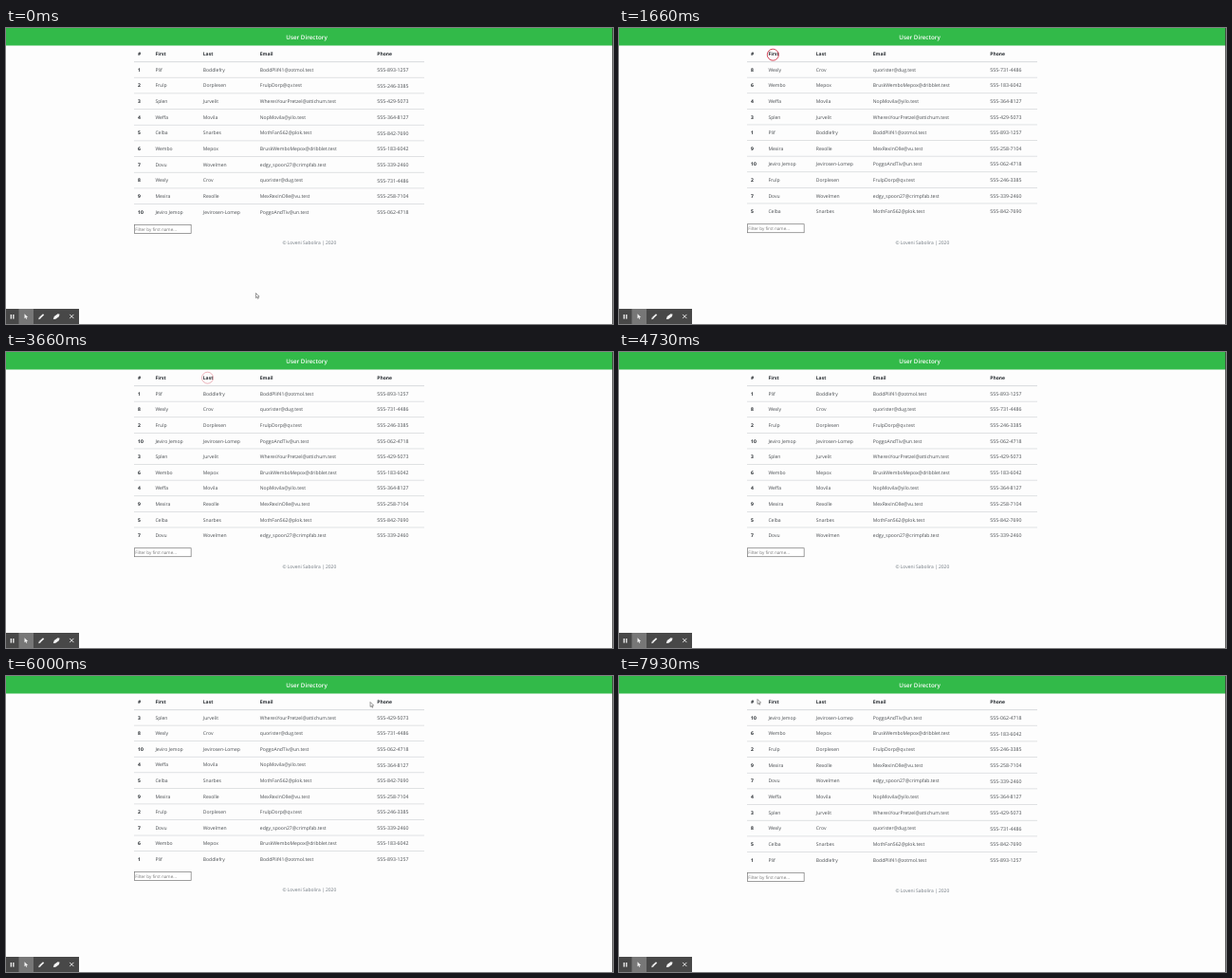
An HTML page with a canvas for the animation above (8 s loop, 640 by 312 pixels).

```html
<!DOCTYPE html>
<html lang="en">
<head>
<meta charset="utf-8">
<title>User Directory</title>
<style>
html, body { margin: 0; width: 100%; height: 100%; overflow: hidden; background: #fdfdfd; }
canvas { display: block; width: 640px; height: 312px; }
</style>
</head>
<body>
<canvas id="stage"></canvas>
<script>
const LOOP = 8000;
const FONT = '"Open Sans", "Noto Sans", sans-serif';
const canvas = document.getElementById('stage');
const ctx = canvas.getContext('2d');
const dpr = window.devicePixelRatio || 1;
canvas.width = 640 * dpr;
canvas.height = 312 * dpr;

const COLUMNS = [139, 157.4, 207.8, 267.8, 391.3];
const TITLES = ['#', 'First', 'Last', 'Email', 'Phone'];
const TITLE_ENDS = [143, 169, 218, 282, 408];
const USERS = [
  ['1', 'Plif', 'Boddlefry', 'BoddPlif41@zotmol.test', '555-893-1257'],
  ['2', 'Frulp', 'Dorplesen', 'FrulpDorp@qv.test', '555-246-3385'],
  ['3', 'Splen', 'Jurvelit', 'WheresYourPretzel@attichum.test', '555-429-5073'],
  ['4', 'Weffa', 'Movila', 'NopMovila@yilo.test', '555-364-8127'],
  ['5', 'Celba', 'Snarbes', 'MothFan562@plok.test', '555-842-7690'],
  ['6', 'Wembo', 'Mepox', 'BruskWemboMepox@dribblet.test', '555-183-6042'],
  ['7', 'Dovu', 'Wovelmen', 'edgy_spoon27@crimpfab.test', '555-339-2460'],
  ['8', 'Wexly', 'Crov', 'quorister@dug.test', '555-731-4486'],
  ['9', 'Mexira', 'Rexolle', 'MexRexInOlle@vu.test', '555-258-7104'],
  ['10', 'Jeviro Jemop', 'Jevirosen-Lomep', 'PoggoAndTiv@un.test', '555-062-4718']
];

function sortBy(col, dir) {
  const key = user => user[col].toLowerCase();
  return [...USERS].sort((a, b) => dir * (key(a) < key(b) ? -1 : 1));
}

// Each click sorts the table shortly after the press.
const SORT_DELAY = 90;
const RIPPLE = 600;
const FULL_PITCH = 16.67;
const CLICKS = [
  { at: 1260, x: 162.3, y: 28.2, rows: sortBy(1, -1), pitch: 16.6 },
  { at: 3120, x: 212.5, y: 27.2, rows: sortBy(2, 1), pitch: 16.6 },
  { at: 4760, x: 273, y: 27.2, rows: sortBy(3, -1), pitch: 16.56 },
  { at: 6730, x: 397, y: 27.2, rows: sortBy(4, 1), pitch: FULL_PITCH }
];

// Pointer path: time, x, y
const PATH = [
  [0, 263.5, 279.5], [60, 262.5, 278], [400, 240, 160], [700, 172, 60],
  [860, 156, 35], [1060, 162, 28], [1860, 162, 28], [2060, 170, 27.5],
  [2500, 198, 27], [2900, 212.5, 27], [3800, 212.5, 27], [4300, 246, 28],
  [4660, 273, 27], [5360, 273, 27], [5660, 304, 30], [6000, 384, 27.5],
  [6260, 397, 27], [7250, 397, 27], [7530, 338, 34], [7750, 224, 35],
  [7930, 146, 24.5], [8000, 146, 24.5]
];

const slope = (i, k) => (PATH[i + 1][k] - PATH[i][k]) / (PATH[i + 1][0] - PATH[i][0]);

function tangent(i, k) {
  if (i === 0 || i === PATH.length - 1) return 0;
  const a = slope(i - 1, k), b = slope(i, k);
  return a * b <= 0 ? 0 : 2 * a * b / (a + b);
}

function pointer(t) {
  let i = 0;
  while (i < PATH.length - 2 && t >= PATH[i + 1][0]) i++;
  const span = PATH[i + 1][0] - PATH[i][0];
  const u = (t - PATH[i][0]) / span;
  return [1, 2].map(k =>
    PATH[i][k] * (1 + 2 * u) * (1 - u) ** 2 +
    PATH[i + 1][k] * u * u * (3 - 2 * u) +
    span * u * (1 - u) * ((1 - u) * tangent(i, k) - u * tangent(i + 1, k)));
}

function rect(x, y, w, h, color) {
  ctx.fillStyle = color;
  ctx.fillRect(x, y, w, h);
}

function text(str, x, y, size, color, weight = 400, align = 'left') {
  ctx.font = `${weight} ${size}px ${FONT}`;
  ctx.textAlign = align;
  ctx.fillStyle = color;
  ctx.fillText(str, x, y + size * 0.357);
}

function shape(points, fill, stroke, width = 0.6) {
  ctx.beginPath();
  points.forEach(([x, y]) => ctx.lineTo(x, y));
  ctx.closePath();
  if (fill) {
    ctx.fillStyle = fill;
    ctx.fill();
  }
  if (stroke) {
    ctx.strokeStyle = stroke;
    ctx.lineWidth = width;
    ctx.stroke();
  }
}

function line(x1, y1, x2, y2, color, width) {
  ctx.beginPath();
  ctx.moveTo(x1, y1);
  ctx.lineTo(x2, y2);
  ctx.strokeStyle = color;
  ctx.lineWidth = width;
  ctx.stroke();
}

function arrow(x, y, fill, stroke) {
  const outline = [[0, 0], [0, 5], [1.2, 4], [2, 5.8], [2.8, 5.4], [2, 3.7], [3.6, 3.6]];
  shape(outline.map(([dx, dy]) => [x + dx, y + dy]), fill, stroke);
}

function drawTable(rows, pitch) {
  TITLES.forEach((title, c) => text(title, COLUMNS[c], 27.2, 5, '#24292e', 700));
  rows.forEach((user, r) => {
    const y = 44 + r * pitch;
    rect(135, y - 8.8, 306, r ? 0.7 : 1, r ? '#d3d6d9' : '#d6d9dc');
    user.forEach((cell, c) =>
      text(cell, COLUMNS[c], y, c === 4 ? 5.22 : 5.05, c ? '#484c50' : '#24292e', c ? 400 : 700));
  });
}

function drawFooter(dy) {
  rect(135, 207 + dy, 60.5, 9.7, '#767676');
  rect(135.7, 207.7 + dy, 59.1, 8.3, '#fff');
  text('Filter by first name...', 136.2, 212 + dy, 4.6, '#757575');
  text('© Loveni Sabolira | 2020', 319.8, 226.4 + dy, 4.95, '#6c757d', 400, 'center');
}

function drawToolbar() {
  const white = '#f4f4f4';
  rect(0, 296, 77, 16, '#484848');
  rect(13.5, 296, 15.5, 16, '#777');
  rect(4.7, 302, 1.3, 4.6, white);
  rect(7.2, 302, 1.3, 4.6, white);
  arrow(19.5, 301.3, white);
  line(35.6, 305.6, 39.6, 301.9, white, 1.7);
  shape([[34.2, 307.2], [34.9, 304.8], [36.5, 306.4]], white);
  shape([[49.8, 306.9], [50.8, 303.9], [54.6, 301.3], [56.6, 301.8], [55.8, 304.2], [52.4, 306.7]], white);
  line(67.2, 301.9, 71.4, 306.1, white, 0.9);
  line(71.4, 301.9, 67.2, 306.1, white, 0.9);
}

function drawPointer(t) {
  const [x, y] = pointer(t);
  const overTitle = y < 31 && y > 22 &&
    COLUMNS.some((left, c) => x > left && x < TITLE_ENDS[c]);
  if (!overTitle) arrow(x, y, '#fff', '#555');
}

function drawRipple(t) {
  const click = CLICKS.find(c => t >= c.at && t < c.at + RIPPLE);
  if (!click) return;
  const age = t - click.at;
  ctx.globalAlpha = Math.min(1, 0.35 + age / 600, (RIPPLE - age) / 150);
  ctx.beginPath();
  ctx.arc(click.x, click.y, Math.min(6, 2 + age / 100), 0, Math.PI * 2);
  ctx.strokeStyle = '#cf3147';
  ctx.lineWidth = 0.9;
  ctx.stroke();
  ctx.globalAlpha = 1;
}

function draw(t) {
  ctx.setTransform(dpr, 0, 0, dpr, 0, 0);
  ctx.textRendering = 'geometricPrecision';
  rect(0, 0, 640, 312, '#fdfdfd');
  rect(0, 0, 640, 18.5, '#32ba49');
  text('User Directory', 317, 9.6, 6.25, '#fff', 600, 'center');

  let rows = USERS, pitch = FULL_PITCH;
  for (const click of CLICKS) {
    if (t >= click.at + SORT_DELAY) ({ rows, pitch } = click);
  }
  drawTable(rows, pitch);
  drawFooter(9 * (pitch - FULL_PITCH));
  rect(639.2, 0, 0.8, 312, '#3c3c3c');
  drawToolbar();
  drawRipple(t);
  drawPointer(t);
}

const start = performance.now();
function tick() {
  draw((performance.now() - start) % LOOP);
  requestAnimationFrame(tick);
}
tick();
</script>
</body>
</html>
```
